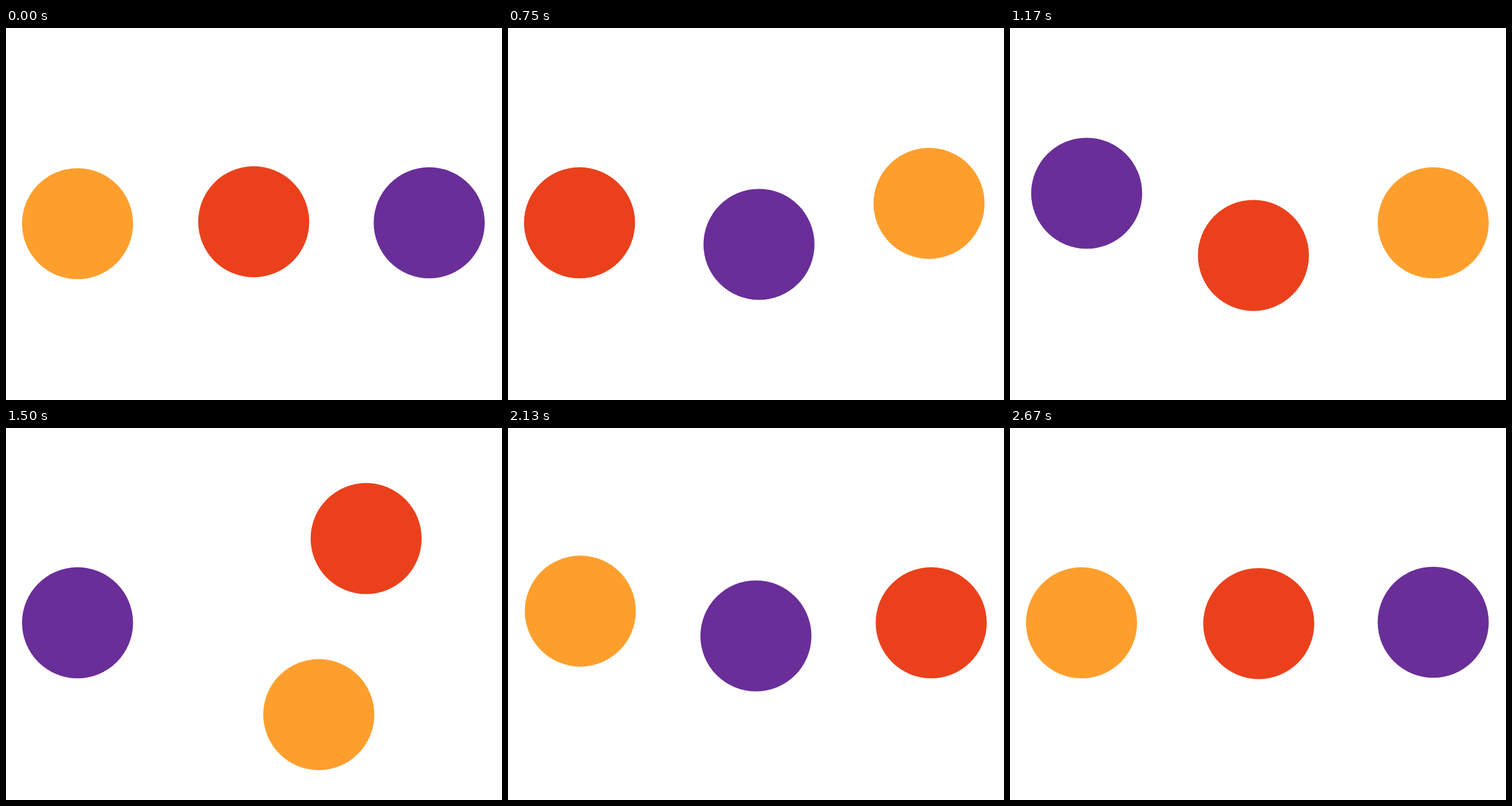
Animation of 864x648 px, one loop 2.7 s. Source, as an HTML page:

```html
<!DOCTYPE html>
<html lang="en">
<head>
<meta charset="utf-8">
<title>Shuffling dots</title>
<style>
  html, body { margin: 0; width: 100%; height: 100%; overflow: hidden; background: #fff; }
  svg { display: block; width: 864px; height: 648px; }
</style>
</head>
<body>
<svg viewBox="0 0 864 648">
  <circle r="96.7" fill="#fe9f2d"/>
  <circle r="96.7" fill="#ea411c"/>
  <circle r="96.7" fill="#6a2e98"/>
</svg>
<script>
const dots = [...document.querySelectorAll('circle')];
const SWAP = 450, SWAPS = 6;
// The lower arc is taller and runs slightly behind the upper one.
const upper = { slots: [124.6, 431.5, 737.2], y: 339.3, height: -152.9, lead: 2.8 };
const lower = { slots: [124.6, 433.3, 737.2], y: 339.6, height: 165.6, lead: 1.5 };

// cubic-bezier(.25, .1, .25, 1)
function ease(x) {
  let lo = 0, hi = 1, s;
  for (let i = 0; i < 24; i++) {
    s = (lo + hi) / 2;
    if (.75 * s * (1 - s) + s ** 3 < x) lo = s; else hi = s;
  }
  return .3 * s * (1 - s) ** 2 + 3 * s * s * (1 - s) + s ** 3;
}

function place(dot, x, y) {
  dot.setAttribute('cx', x);
  dot.setAttribute('cy', y);
}

function travel(dot, arc, from, to, time) {
  const a = arc.slots[from], b = arc.slots[to];
  const angle = Math.PI * ease(Math.min(1, (time + arc.lead) / SWAP));
  place(dot, (a + b) / 2 + (a - b) / 2 * Math.cos(angle), arc.y + arc.height * Math.sin(angle));
}

function draw() {
  const t = performance.now() % (SWAP * SWAPS);
  const step = Math.floor(t / SWAP), time = t - step * SWAP;

  // Swaps alternate between the left pair and the right pair.
  const order = [...dots];
  for (let i = 0; i < step; i++) {
    const k = i % 2;
    [order[k], order[k + 1]] = [order[k + 1], order[k]];
  }
  const k = step % 2, rest = k ? 0 : 2;
  travel(order[k], k ? upper : lower, k, k + 1, time);
  travel(order[k + 1], k ? lower : upper, k + 1, k, time);
  place(order[rest], upper.slots[rest], upper.y);
  requestAnimationFrame(draw);
}
draw();
</script>
</body>
</html>
```
